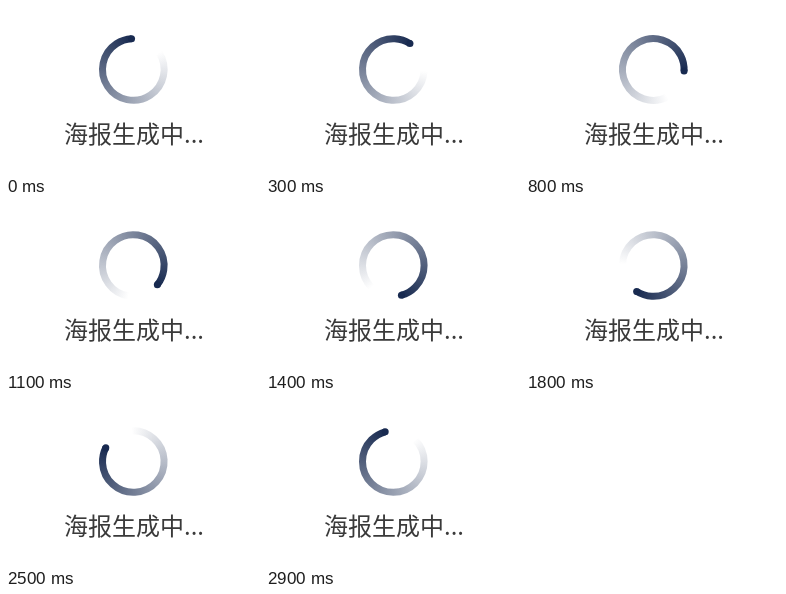
Recreate the animation shown at these times as an HTML page with a canvas. Size 254 by 168 pixels, loop 3000 ms.

```html
<!DOCTYPE html>
<html lang="zh-CN">
<head>
<meta charset="utf-8">
<style>
  html, body { margin: 0; width: 100%; height: 100%; overflow: hidden; background: #fff; }
  canvas { position: absolute; left: 0; top: 0; }
  p {
    position: absolute; left: 58px; top: 109px; margin: 0;
    font: 24px/36px "Noto Sans CJK SC", "Noto Sans CJK", sans-serif;
    color: #3a3a3a; white-space: nowrap;
  }
</style>
</head>
<body>
<canvas width="254" height="168"></canvas>
<p>海报生成中...</p>
<script>
const ctx = document.querySelector("canvas").getContext("2d");
const LOOP = 3000, STEP = 100;
const CX = 127.3, CY = 63.5, RADIUS = 30.8, WIDTH = 7;
const SWEEP = 300 / 360;
const TURN = Math.PI * 2;
const COLOR = "rgb(24, 42, 80)", CLEAR = "rgba(24, 42, 80, 0)";

// The ring fades from a solid round head back to a transparent tail.
function drawRing(head) {
  const tail = head - SWEEP * TURN;
  // The gradient's seam lies in the middle of the gap, away from both ends.
  const gap = (1 - SWEEP) / 2;
  const fade = ctx.createConicGradient(tail - gap * TURN, CX, CY);
  fade.addColorStop(gap, CLEAR);
  fade.addColorStop(gap + SWEEP, COLOR);

  ctx.clearRect(0, 0, 254, 168);
  ctx.strokeStyle = fade;
  ctx.lineWidth = WIDTH;
  ctx.beginPath();
  ctx.arc(CX, CY, RADIUS, tail, head);
  ctx.stroke();

  ctx.fillStyle = COLOR;
  ctx.beginPath();
  ctx.arc(CX + RADIUS * Math.cos(head), CY + RADIUS * Math.sin(head), WIDTH / 2, 0, TURN);
  ctx.fill();
}

function frame() {
  const time = performance.now() % LOOP;
  const progress = Math.floor(time / STEP) * STEP / LOOP;
  drawRing((progress - 0.25 - 0.009) * TURN);
  requestAnimationFrame(frame);
}
frame();
</script>
</body>
</html>
```
